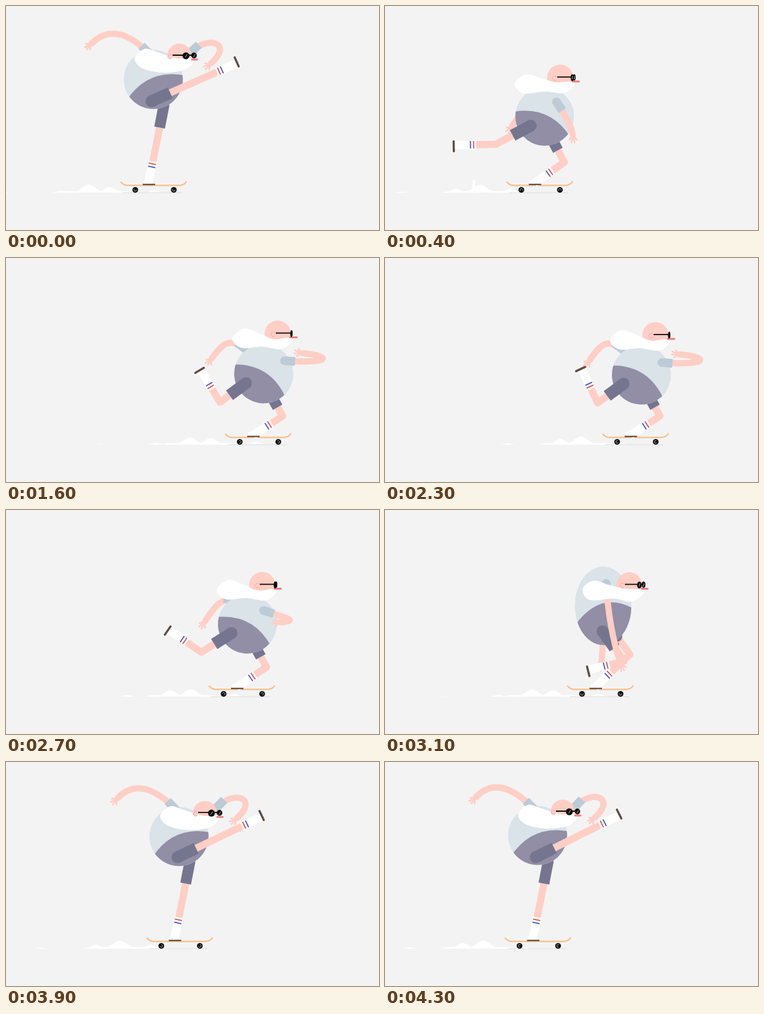
An HTML page with a canvas that plays this animation: 600x360 px, repeating every 4.4 s.

```html
<!DOCTYPE html>
<html lang="en">
<head>
<meta charset="utf-8">
<title>Skater</title>
<style>
  html, body { margin: 0; width: 100%; height: 100%; overflow: hidden; background: #f3f3f3; }
  canvas { display: block; width: 600px; height: 360px; }
</style>
</head>
<body>
<canvas id="stage" width="600" height="360"></canvas>
<script>
const ctx = document.getElementById('stage').getContext('2d');
const LOOP = 4400, GROUND = 300, TAU = Math.PI * 2;
const SKIN = '#ffcec5', SHIRT = '#d9e3e8', SLEEVE = '#bccbd6', SHORTS = '#918ea5',
      THIGH = '#75758f', SOLE = '#5c4d46', RED = '#d9534f', BLUE = '#4358c4', INK = '#0c0c0c';

// Board centre over time: [ms, x]
const TRAVEL = [[0, 239], [150, 227], [300, 226], [400, 250], [500, 286], [600, 318.5], [800, 367],
  [1200, 398], [1600, 407], [1900, 409.5], [2300, 404.5], [2800, 374], [3100, 348], [3600, 306],
  [4300, 247.5], [4400, 239]];

// Beard outlines, relative to the head
const BEARD = {
  kick: [-72, 4, -56, -11, -36, -6, -4, 4, 21, 4, 20, 14, 4, 24, -28, 27, -60, 20],
  wave: [-74, 16, -56, 2, -30, 4, -6, 3, 21, 8, 18, 18, 3, 25, -22, 26, -60, 31],
  glide: [-73, 8, -54, -8, -27, 1, -6, 9, 21, 6, 19, 17, 3, 25, -25, 21, -58, 23],
  crouch: [-75, 6, -57, -7, -32, 0, -6, 6, 21, 7, 20, 17, 2, 27, -24, 22, -64, 24]
};

// x is relative to the board centre.
// body: x y rx ry turn; head: x y r yaw; swing: hip, thigh angle+length, shin angle+length;
// stand: hip, knee, hem; near/far: cubic from shoulder to wrist
const KICK = {
  body: [-2, 118, 47.5, 47.5, -22], head: [40, 80, 19.5, 1],
  swing: [-5, 153, -24, 75, -24, 76], stand: [15, 160, 3, 222, 36],
  near: [-9, 76, -45, 40, -76, 35, -101, 60], far: [59, 74, 89, 45, 126, 62, 91, 92],
  beard: BEARD.kick
};
const LAND = { ...KICK, body: [-3, 121, 47.5, 47.5, -22], head: [40, 84, 19.5, 1] };
const RISE = { ...KICK, head: [38, 80, 19.5, 1], swing: [-5, 153, -27.5, 75, -27.5, 76],
  near: [-9, 74, -45, 36, -76, 29, -101, 55], far: [57, 72, 87, 40, 124, 58, 90, 88] };
const PUSH = {
  body: [2, 140, 47, 47, -5], head: [38, 95, 20, 0.7],
  swing: [-3, 170, 103, 65, 108, 66], stand: [15, 175, 30, 228, 28],
  near: [-5, 105, -30, 110, -50, 125, -60, 140], far: [45, 105, 75, 100, 95, 105, 85, 120],
  beard: BEARD.kick
};
const BACK = {
  body: [6, 175, 47, 47, 20], head: [32, 114, 21, 0.3],
  swing: [-14, 190, 155, 68, 160, 70], stand: [16, 208, 38, 250, 24],
  near: [20, 150, 15, 180, 25, 210, 45, 226], far: [0, 140, -12, 165, -24, 185, -35, 205],
  beard: BEARD.glide
};
const RUN = {
  body: [8, 184, 47.5, 47.5, 32], head: [30, 118.5, 21, 0],
  swing: [-21, 199, 143.5, 52, 232, 61], stand: [18, 218, 38, 254, 24],
  near: [41, 165, 113, 170, 121, 158, 70, 153], far: [-18, 144, -42, 125, -54, 136, -75, 158],
  beard: BEARD.wave
};
const GLIDE = { ...RUN, body: [7.5, 186, 47.5, 47.5, 32], head: [30, 121.5, 21, 0],
  swing: [-21, 201, 143.5, 52, 239, 61], stand: [18, 219, 38, 254, 24],
  far: [-22, 146, -48, 127, -58, 137, -76, 161], beard: BEARD.glide };
const SETTLE = { ...GLIDE, body: [8, 188, 47.5, 47.5, 32], head: [30.5, 124, 21, 0],
  swing: [-20.5, 202, 143.5, 52, 245, 61],
  near: [41, 168, 113, 173, 121, 160, 70, 155], far: [-22, 147, -48, 128, -58, 139, -75, 164] };
const CROUCH = {
  body: [3, 154, 45.5, 63, -11], head: [45, 120.5, 20.5, 0.5],
  swing: [2, 195, 54, 59, 166, 60], stand: [25, 203, 46, 232, 0],
  near: [8, 118, 10, 160, 18, 210, 31, 246], far: [2, 170, 3, 205, 3, 225, 0, 246],
  beard: BEARD.crouch
};
const SWING = {
  body: [2, 145, 47, 54, -16], head: [44, 108, 20, 0.7],
  swing: [12, 162, 2, 76, 3, 78], stand: [18, 175, 30, 225, 20],
  near: [0, 100, -25, 120, -50, 130, -75, 125], far: [40, 110, 70, 120, 95, 130, 90, 120],
  beard: BEARD.crouch
};
const ACTS = [[0, KICK], [180, PUSH], [300, BACK], [600, RUN], [800, RUN], [1500, GLIDE],
  [2300, SETTLE], [2600, SETTLE], [2850, BACK], [3100, CROUCH], [3300, SWING], [3600, LAND],
  [4250, RISE], [4400, KICK]];

// Dust bump life: [age, x, height]
const DUST = [[-500, 0, 4], [-400, -4, 5], [-200, -25, 3], [0, -72, 9], [300, -89, 13], [500, -106, 13],
  [800, -122, 9], [1000, -150, 3.5], [1100, -165, 3], [1300, -207, 2], [1500, -240, 1], [1700, -270, 0]];

const lerp = (a, b, k) => a + (b - a) * k;
const mix = (a, b, k) => a.map((v, i) => lerp(v, b[i], k));
const polar = (x, y, deg, r) => [x + r * Math.cos(deg * TAU / 360), y + r * Math.sin(deg * TAU / 360)];
const toward = (a, b, d) => {
  const k = d / (Math.hypot(b[0] - a[0], b[1] - a[1]) || 1);
  return mix(a, b, k);
};

function span(keys, t) {
  let i = 0;
  while (i < keys.length - 2 && t >= keys[i + 1][0]) i++;
  const k = (t - keys[i][0]) / (keys[i + 1][0] - keys[i][0]);
  return [i, Math.min(1, Math.max(0, k))];
}

function boardX(t) {
  const [i, k] = span(TRAVEL, t), a = TRAVEL[i], b = TRAVEL[i + 1], w = b[0] - a[0];
  const slope = j => {
    const p = TRAVEL[Math.max(0, j - 1)], q = TRAVEL[Math.min(TRAVEL.length - 1, j + 1)];
    return (q[1] - p[1]) / (q[0] - p[0]) * w;
  };
  const m = slope(i), n = slope(i + 1), d = b[1] - a[1];
  return a[1] + k * (m + k * (3 * d - 2 * m - n + k * (m + n - 2 * d)));
}

function poseAt(t) {
  const [i, k] = span(ACTS, t), a = ACTS[i][1], b = ACTS[i + 1][1], e = k * k * (3 - 2 * k);
  return Object.fromEntries(Object.keys(a).map(part => [part, mix(a[part], b[part], e)]));
}

function line(color, width, points, cap = 'butt') {
  ctx.strokeStyle = color;
  ctx.lineWidth = width;
  ctx.lineCap = cap;
  ctx.lineJoin = 'round';
  ctx.beginPath();
  points.forEach(p => ctx.lineTo(p[0], p[1]));
  ctx.stroke();
}

function oval(color, x, y, rx, ry = rx) {
  ctx.fillStyle = color;
  ctx.beginPath();
  ctx.ellipse(x, y, rx, ry, 0, 0, TAU);
  ctx.fill();
}

function blob(color, flat) {
  const n = flat.length / 2, at = i => [flat[(i + n) % n * 2], flat[(i + n) % n * 2 + 1]];
  ctx.fillStyle = color;
  ctx.beginPath();
  ctx.moveTo(...at(0));
  for (let i = 0; i < n; i++) {
    const [p, a, b, q] = [at(i - 1), at(i), at(i + 1), at(i + 2)];
    ctx.bezierCurveTo(a[0] + (b[0] - p[0]) / 6, a[1] + (b[1] - p[1]) / 6,
      b[0] - (q[0] - a[0]) / 6, b[1] - (q[1] - a[1]) / 6, b[0], b[1]);
  }
  ctx.fill();
}

function arm([sx, sy, ax, ay, bx, by, wx, wy]) {
  ctx.strokeStyle = SKIN;
  ctx.lineWidth = 10;
  ctx.lineCap = 'round';
  ctx.beginPath();
  ctx.moveTo(sx, sy);
  ctx.bezierCurveTo(ax, ay, bx, by, wx, wy);
  ctx.stroke();
  const deg = Math.atan2(wy - by, wx - bx) * 360 / TAU;
  const palm = polar(wx, wy, deg, 2);
  for (const [turn, reach] of [[-38, 9], [-8, 11], [18, 11], [48, 8]])
    line(SKIN, 2.8, [palm, polar(...palm, deg + turn, reach)], 'round');
  line(SLEEVE, 14, [[sx, sy], toward([sx, sy], [ax, ay], 17)]);
  oval(SLEEVE, sx, sy, 7);
}

function leg(hip, knee, foot, hem, width) {
  const top = toward(foot, knee, 36), cuff = toward(hip, knee, hem);
  line(SKIN, 11.5, [hem ? cuff : hip, knee, top]);
  line('#fff', 13.5, [top, foot]);
  const across = Math.atan2(foot[1] - top[1], foot[0] - top[0]) * 360 / TAU + 90;
  [[RED, 4], [BLUE, 9]].forEach(([color, d]) => {
    const c = toward(top, foot, d);
    line(color, 1.8, [polar(...c, across, -6), polar(...c, across, 6)]);
  });
  if (hem) {
    line(THIGH, width, [hip, cuff]);
    oval(THIGH, ...hip, width / 2);
  }
  return across;
}

function torso([x, y, rx, ry, turn]) {
  ctx.save();
  ctx.translate(x, y);
  ctx.scale(rx / 47, ry / 47);
  ctx.rotate(turn * TAU / 360);
  oval(SHIRT, 0, 0, 47);
  ctx.clip();
  ctx.fillStyle = SHORTS;
  ctx.beginPath();
  ctx.moveTo(-52, 15);
  ctx.quadraticCurveTo(0, -21, 52, 15);
  ctx.lineTo(52, 60);
  ctx.lineTo(-52, 60);
  ctx.fill();
  ctx.restore();
}

function face([x, y, r, yaw], beard) {
  ctx.save();
  ctx.translate(x, y);
  oval(SKIN, 0, 0, r);
  blob('#fff', beard);
  const ear = -7 - 8 * yaw, lens = 22 - 11.5 * yaw, other = 22.5 + yaw;
  oval(SKIN, ear, 1, 4);
  ctx.strokeStyle = '#f0aaa4';
  ctx.lineWidth = 0.9;
  ctx.beginPath();
  ctx.arc(ear, 1, 3.6, 1, 5.6);
  ctx.stroke();
  line('#ee7c7c', 3, [[20, 6], [30.5 - 2 * yaw, 6]], 'round');
  line(INK, 1.8, [[ear + 4, -1], [other, -1]]);
  oval(INK, lens, 0, 1.8 + 3.7 * yaw, 5.6);
  oval(INK, other, -0.5, 1.5 + 3 * yaw, 5.1 - 0.4 * yaw);
  if (yaw > 0.2) [lens, other].forEach(c =>
    line('#fff', 0.7, [[c - yaw, 2.5], [c + 2 * yaw, -2.5]]));
  ctx.restore();
}

function board(t) {
  line('#dcdcdc', 1, [[-51, 300], [45, 300]]);
  ctx.strokeStyle = '#f8bf88';
  ctx.lineWidth = 2.2;
  ctx.lineCap = 'round';
  ctx.beginPath();
  ctx.moveTo(-54, 283);
  ctx.quadraticCurveTo(-50, 288, -44, 288.3);
  ctx.lineTo(40, 288.3);
  ctx.quadraticCurveTo(48, 288, 51, 282.5);
  ctx.stroke();
  for (const x of [-31, 31]) {
    oval(INK, x, 295.5, 4.6);
    ctx.strokeStyle = '#d8d8d8';
    ctx.lineWidth = 0.8;
    ctx.beginPath();
    ctx.arc(x, 295.5, 2.1, t / 45, t / 45 + 4);
    ctx.stroke();
  }
}

function dust(t) {
  const bumps = [-1, 0, 1, 2, 3].map(n => t % 500 + n * 500).filter(age => age < 1700).map(age => {
    const [i, k] = span(DUST, age);
    return mix(DUST[i], DUST[i + 1], k);
  });
  ctx.fillStyle = '#fff';
  ctx.beginPath();
  ctx.moveTo(-285, GROUND);
  for (let x = -285; x <= 30; x += 3) {
    const base = 2.6 * Math.min(1, Math.max(0, (x + 160) / 14), Math.max(0, (-34 - x) / 14));
    const h = bumps.reduce((m, [, p, top]) =>
      Math.max(m, top * Math.exp(-(((x - p) / (6 + top * 0.7)) ** 2))), base);
    ctx.lineTo(x, GROUND - (h < 0.25 ? 0 : h));
  }
  ctx.lineTo(30, GROUND);
  ctx.fill();
}

function puff(t) {
  if (t < 250 || t > 1200) return;
  const size = Math.min(1, (t - 250) / 350);
  ctx.save();
  ctx.translate(180 - (t - 250) * 0.245, GROUND);
  ctx.scale(size, size);
  blob('#fff', [1, -49, -5, -43, -4, -34, -8, -24, -6, -11, 2, 0, 16, 0, 6, -8, 3, -18, 5, -27, 4, -34, 6, -43]);
  ctx.restore();
}

function draw(t) {
  ctx.fillStyle = '#f3f3f3';
  ctx.fillRect(0, 0, 600, 360);
  puff(t);
  ctx.save();
  ctx.translate(boardX(t), 0);
  dust(t);
  const p = poseAt(t);
  board(t);
  arm(p.far);
  const [sx, sy, kx, ky, hem] = p.stand;
  leg([sx, sy], [kx, ky], [-10, 285], hem, 17.5);
  line('#fff', 6, [[-15, 283], [-5, 283]], 'round');
  line(SOLE, 2.2, [[-19, 286.8], [1, 286.8]]);

  const [hx, hy, thigh, upper, shin, lower] = p.swing;
  const knee = polar(hx, hy, thigh, upper), foot = polar(...knee, shin, lower);
  torso(p.body);
  const across = leg([hx, hy], knee, foot, 33, 19);
  line(SOLE, 3.4, [polar(...foot, across, -10), polar(...foot, across, 6)], 'round');
  arm(p.near);
  face(p.head, p.beard);
  ctx.restore();
}

const start = performance.now();
function tick() {
  draw((performance.now() - start) % LOOP);
  requestAnimationFrame(tick);
}
tick();
</script>
</body>
</html>
```
